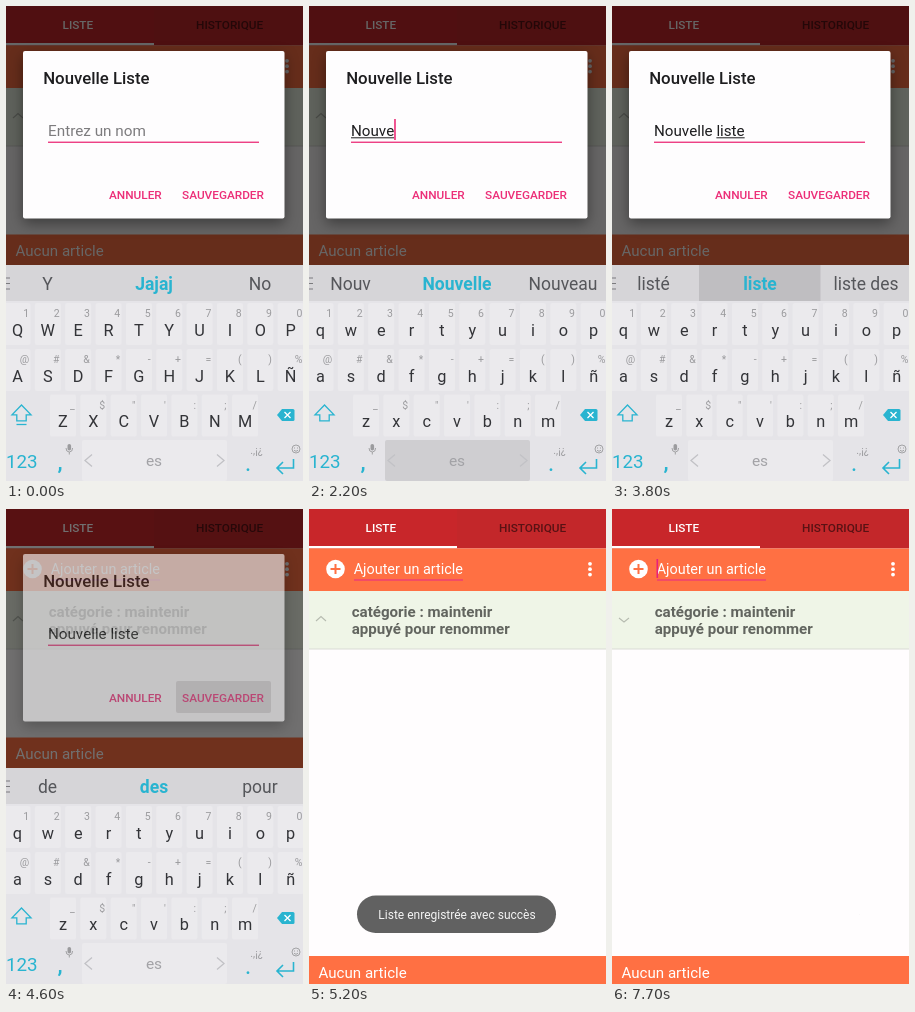
These frames come from a looping animation (297 by 475 pixels, 8000 ms). An HTML page:

```html
<!DOCTYPE html>
<html lang="fr">
<head>
<meta charset="utf-8">
<title>Nouvelle liste</title>
<style>
html, body { margin: 0; width: 100%; height: 100%; overflow: hidden; background: #fffdfe; }
svg { display: block; width: 297px; height: 475px; }
text { font-family: Roboto, "Open Sans", sans-serif; white-space: pre; }
.sheet { filter: drop-shadow(0 5px 7px rgba(0, 0, 0, .4)); }
</style>
</head>
<body>
<svg id="stage" viewBox="0 0 297 475"></svg>
<script>
const LOOP = 8000, STEP = 100;
const CYAN = '#29b4d0', PINK = '#ec2e78', ORANGE = '#ff7043', GREY = '#9b9b9e';
const stage = document.getElementById('stage');

function el(tag, attrs, parent = stage) {
  const node = document.createElementNS('http://www.w3.org/2000/svg', tag);
  set(node, attrs);
  parent.appendChild(node);
  return node;
}
function set(node, attrs) {
  for (const k in attrs) node.setAttribute(k, attrs[k]);
}
const group = parent => el('g', {}, parent);
const box = (parent, x, y, width, height, fill, rx = 0) =>
  el('rect', { x, y, width, height, fill, rx }, parent);
const line = (parent, d, stroke, width = 1) =>
  el('path', { d, stroke, 'stroke-width': width, fill: 'none' }, parent);
function label(parent, str, x, y, size, fill, anchor = 'start', weight = 400) {
  const node = el('text', { x, y, 'font-size': size, fill, 'text-anchor': anchor, 'font-weight': weight }, parent);
  node.textContent = str;
  return node;
}
const show = (node, on) => node.setAttribute('visibility', on ? 'visible' : 'hidden');
const ramp = (t, a, b) => Math.min(1, Math.max(0, (t - a) / (b - a)));
const latest = (table, t) => table.filter(row => row[0] <= t).pop();

// Main screen
const page = group();
box(page, 0, 0, 297, 475, '#fffdfe');
box(page, 0, 0, 148, 39.5, '#c8262a');
box(page, 148, 0, 149, 39.5, '#c3272a');
box(page, 0, 37, 148, 2.2, '#fff');
label(page, 'LISTE', 56.5, 23, 11.8, '#fff', 'start', 500);
label(page, 'HISTORIQUE', 190, 23, 11.8, '#591214', 'start', 500);
box(page, 0, 39.5, 297, 42.5, ORANGE);
el('circle', { cx: 26.5, cy: 60, r: 9.3, fill: '#fff' }, page);
line(page, 'M21.5 60h10M26.5 55v10', ORANGE, 2);
label(page, 'Ajouter un article', 44.7, 65, 14.4, '#fff');
line(page, 'M45 71h109', '#ee3f73', 1.3);
const addCaret = box(page, 44.5, 50, 1.6, 19, '#e8207c');
for (const cy of [54.8, 60.2, 65.6]) el('circle', { cx: 281, cy, r: 1.9, fill: '#fff' }, page);
box(page, 0, 82, 297, 58, '#eff5e7');
box(page, 0, 139.5, 297, 1, '#d9dcd5');
const chevron = line(page, '', '#b6bbb0', 1.1);
label(page, 'catégorie : maintenir', 42.7, 108, 15.1, '#62655f', 'start', 700);
label(page, 'appuyé pour renommer', 42.7, 125, 15.1, '#62655f', 'start', 700);
const footer = group(page);
box(footer, 0, 0, 297, 31, ORANGE);
label(footer, 'Aucun article', 9.5, 21.5, 15.1, '#fff');
const dim = box(stage, 0, 0, 297, 475, '#000');

// Dialog
const dialog = group();
box(dialog, 17, 45, 261.5, 167.5, '#fefdfe', 2).setAttribute('class', 'sheet');
const press = box(dialog, 170, 172, 95, 32, '#dedcde', 2);
label(dialog, 'Nouvelle Liste', 37.2, 78, 16.8, '#1d1d1f', 'start', 500);
const hint = label(dialog, 'Entrez un nom', 42, 130, 15.3, '#7d7c7e');
const field = label(dialog, '', 42, 130, 15.2, '#1d1d1f');
const compose = box(dialog, 42, 131.3, 0, 1, '#1d1d1f');
box(dialog, 42, 135.6, 211, 1.3, PINK);
const caret = box(dialog, 42, 113, 1.6, 21, PINK);
label(dialog, 'ANNULER', 103, 193, 11.8, PINK, 'start', 500);
label(dialog, 'SAUVEGARDER', 176, 193, 11.8, PINK, 'start', 500);

// Keyboard
const board = group();
box(board, 0, 259, 297, 216, '#e5e4e8');
box(board, 0, 259, 297, 36, '#d6d5d8');
const picked = box(board, 87, 259, 121.5, 36, '#bfbec1');
line(board, 'M0 272h4M0 277.5h4M0 283h4', '#7b7b7e', 1.2);
const words = [41.5, 148, 254].map((x, i) =>
  label(board, '', x, 283.5, 17.5, i == 1 ? CYAN : '#55565a', 'middle', i == 1 ? 700 : 400));

const PITCH = 30.35, KEY = '#ebeaed', DOWN = '#cfced1';
const keys = {};
const rows = [
  ['qwertyuiop', '1234567890', 11.5, 297],
  ['asdfghjklñ', '@#&*-+=()%', 11.5, 343],
  ['zxcvbnm', '_$"\':;/', 57, 388.5]
];
for (const [letters, hints, start, y] of rows) {
  [...letters].forEach((ch, i) => {
    const x = start + i * PITCH;
    keys[ch] = {
      x, y,
      cap: box(board, x - 13, y, 26, 42, KEY, 2),
      face: label(board, ch, x, y + 32.5, 16.3, '#333438', 'middle')
    };
    label(board, hints[i], x + 11.7, y + 14, 10.5, GREY, 'end');
  });
}
keys[' '] = { cap: box(board, 76, 434, 145, 41, KEY, 2) };

line(board, 'M15.5 399l9.5 9.8h-4.8v6h-9.4v-6h-4.800z', CYAN, 1.3);
const capsBar = line(board, 'M10.500 418.500h10', CYAN, 1.3);
el('path', { d: 'M271 409l5-6h11q1.5 0 1.5 1.5v9q0 1.5-1.5 1.5h-11z', fill: CYAN }, board);
line(board, 'M278.5 406l6 6m0-6l-6 6', '#fff', 1.3);
label(board, '123', 0, 461.5, 18.8, CYAN);
label(board, ',', 54, 463, 21, CYAN, 'middle', 700);
label(board, '.', 242, 465, 20, CYAN, 'middle', 500);
label(board, '.,¡¿', 250.5, 448, 10.5, GREY, 'middle');
label(board, 'es', 148, 460, 15.5, '#a2a2a6', 'middle');
line(board, 'M86 448.5l-7 6 7 6M211 448.5l7 6-7 6', '#c2c2c6', 1.3);
box(board, 61.5, 438, 3.6, 6.5, GREY, 1.8);
line(board, 'M60 442q0 4 3.3 4t3.3-4M63.3 446v2.5', GREY, .9);
line(board, 'M287.5 453v9h-16M277 456l-6 6 6 6', CYAN, 1.6);
el('circle', { cx: 290, cy: 443, r: 4, fill: 'none', stroke: GREY, 'stroke-width': .9 }, board);
line(board, 'M288 444.3q2 2 4 0M288.5 441.5v1M291.5 441.5v1', GREY, .9);

const popup = group(board);
box(popup, -21, 0, 42, 56.5, CYAN, 2);
const popupFace = label(popup, '', 0, 38, 31, '#fff', 'middle');

// Toast
const toast = group();
box(toast, 48, 386.5, 199, 37.5, '#616161', 18.7);
label(toast, 'Liste enregistrée avec succès', 148, 410, 12, '#f4f4f4', 'middle');

const presses = [
  [900, 'n'], [1200, 'o'], [1400, 'u'], [1700, 'v'], [1900, 'e'], [2200, ' '],
  [2600, 'l'], [2700, 'i'], [2900, 's'], [3000, 't'], [3200, 'e']
];
// time, settled text, underlined text
const entries = [
  [0, '', ''], [1000, '', 'N'], [1300, '', 'No'], [1500, '', 'Nou'], [1800, '', 'Nouv'], [2000, '', 'Nouve'],
  [2300, 'Nouvelle ', ''], [2700, 'Nouvelle ', 'l'], [2800, 'Nouvelle ', 'li'], [3000, 'Nouvelle ', 'lis'],
  [3100, 'Nouvelle ', 'list'], [3300, 'Nouvelle ', 'liste'], [3900, 'Nouvelle liste ', '']
];
const offers = [
  [0, 'Y', 'Jajaj', 'No'], [1000, 'N', 'Ne', 'Nous'], [1300, 'No', 'Non', 'Nous'],
  [1500, 'Nou', 'Nous', 'Nous avons'], [1800, 'Nouv', 'Nouvelle', 'Nouveau'],
  [2300, 'année', 'vie', 'fois'], [2700, 'l', 'L', 'liste'], [2900, 'li', 'lit', 'liste'],
  [3100, 'lis', 'liste', 'lis'], [3300, 'listé', 'liste', 'liste des'], [3900, 'de', 'des', 'pour']
];

const widthOf = n => n ? field.getSubStringLength(0, n) : 0;
const within = (t, a, b) => t >= a && t < b;

function drawField(t) {
  const [, done, draft] = latest(entries, t);
  const all = done + draft;
  if (field.textContent !== all) field.textContent = all;
  const from = widthOf(done.length), to = widthOf(all.length);
  set(compose, { x: 42 + from, width: to - from });
  caret.setAttribute('x', 42 + to);
  show(hint, !all);
  show(caret, within(t, 200, 700) || within(t, 1000, 3800) || within(t, 3900, 4500));
}

function drawBoard(t) {
  const caps = t < 1100;
  const last = latest(presses, t);
  const down = last && t < last[0] + 200 ? last[1] : null;
  for (const ch in keys) {
    const { cap, face } = keys[ch];
    cap.setAttribute('fill', ch === down ? DOWN : KEY);
    if (face) face.textContent = caps ? ch.toUpperCase() : ch;
  }
  show(capsBar, caps);
  show(picked, within(t, 3800, 4000));
  latest(offers, t).slice(1).forEach((word, i) => {
    words[i].textContent = word;
    words[i].setAttribute('font-size', word.length > 9 ? 16.4 : 17.5);
  });
  const raised = down && down !== ' ';
  popup.setAttribute('display', raised ? 'inline' : 'none');
  if (raised) {
    const { x, y } = keys[down];
    popup.setAttribute('transform', `translate(${x} ${y - 60})`);
    popupFace.textContent = caps ? down.toUpperCase() : down;
  }
}

function draw(t) {
  drawField(t);
  drawBoard(t);
  const open = t < 4700;
  board.setAttribute('display', open ? 'inline' : 'none');
  footer.setAttribute('transform', `translate(0 ${open ? 228.5 : 447})`);
  show(press, within(t, 4500, 4800));
  dialog.setAttribute('opacity', 1 - ramp(t, 4500, 4750));
  dialog.setAttribute('display', t < 4800 ? 'inline' : 'none');
  dim.setAttribute('opacity', .6 * (1 - ramp(t, 4580, 4880)));
  toast.setAttribute('opacity', ramp(t, 4700, 5150) * (1 - ramp(t, 6600, 7200)));
  show(addCaret, t >= 4700 && Math.floor((t - 4700) / 500) % 2 === 0);
  const turn = ramp(t, 7100, 7500);
  chevron.setAttribute('d', `M7 ${112 - 3 * turn}L12 ${107.5 + 5.5 * turn}L17 ${112 - 3 * turn}`);
}

const begin = performance.now();
function tick() {
  const t = (performance.now() - begin) % LOOP;
  draw(Math.floor(t / STEP) * STEP);
  requestAnimationFrame(tick);
}
tick();
</script>
</body>
</html>
```
